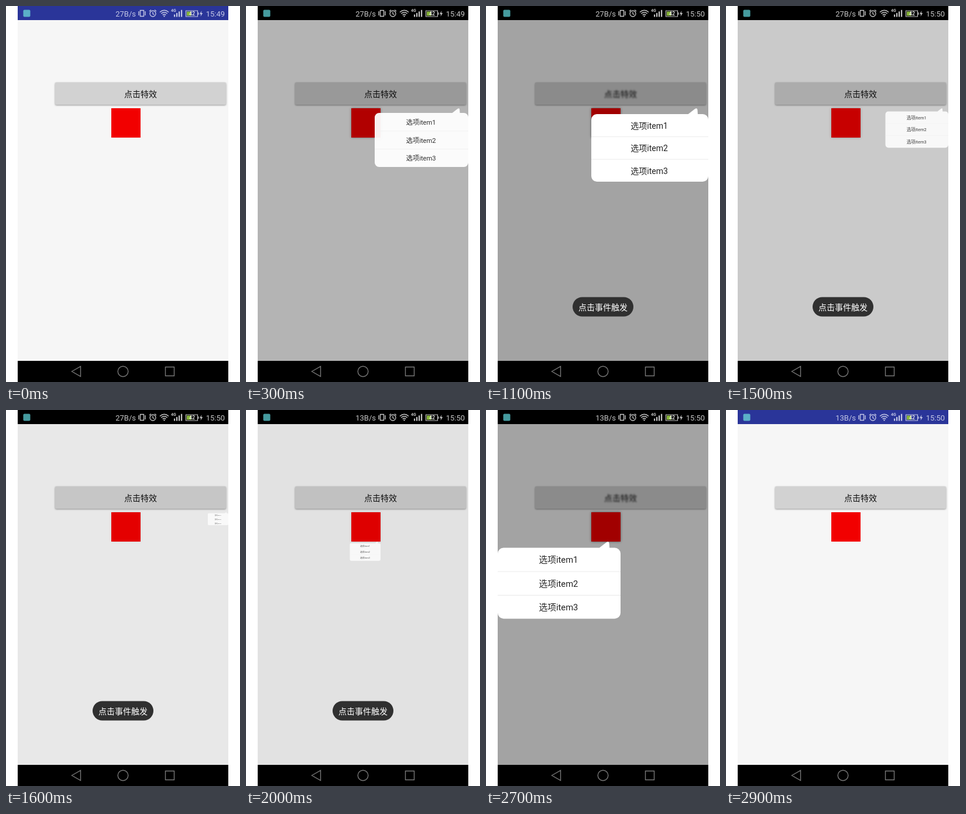
Write an HTML page with a canvas that moves like this. It is 400 px wide and 640 px high and loops after 3000 ms.

```html
<!DOCTYPE html>
<html lang="zh-CN">
<head>
<meta charset="utf-8">
<style>
  html, body { margin: 0; width: 100%; height: 100%; overflow: hidden; background: #fff; }
  canvas { display: block; }
</style>
</head>
<body>
<canvas id="stage" width="400" height="640"></canvas>
<script>
const ctx = document.getElementById('stage').getContext('2d');
const FONT = 'Roboto, "Noto Sans CJK SC", "Noto Sans CJK", sans-serif';

// [step, value] keys; one step is 100 ms
const POPUP = [[0, 0], [1, .15], [3, .8], [5, 1], [13, 1], [14, .9], [16, .175], [17, .03],
  [18, 0], [19, 0], [20, .25], [22, 1], [27, 1], [28, .5], [29, 0]];
const TOAST = [[8, 0], [9, .4], [10, .85], [11, 1], [23, 1], [25, 0]];

function keyed(keys, n) {
  if (n <= keys[0][0]) return keys[0][1];
  for (let i = 1; i < keys.length; i++) {
    const [a, u] = keys[i - 1], [b, v] = keys[i];
    if (n <= b) return u + (v - u) * (n - a) / (b - a);
  }
  return keys[keys.length - 1][1];
}

function box(x, y, w, h, color, r = 0) {
  ctx.fillStyle = color;
  ctx.beginPath();
  ctx.roundRect(x, y, w, h, r);
  ctx.fill();
}

function text(s, x, y, size, color, align = 'center', weight = 400) {
  ctx.font = `${weight} ${size}px ${FONT}`;
  ctx.textAlign = align;
  ctx.fillStyle = color;
  ctx.fillText(s, x, y);
}

function stroke(d, color, width) {
  ctx.strokeStyle = color;
  ctx.lineWidth = width;
  ctx.stroke(new Path2D(d));
}

function shadow(color, blur, y = 0) {
  ctx.shadowColor = color;
  ctx.shadowBlur = blur;
  ctx.shadowOffsetY = y;
}

function statusBar(n, open) {
  const tint = open ? '#c4c4c4' : '#c3c7e6';
  box(20, 0, 360, 24, open ? '#000' : '#2a3599');
  box(29.5, 6.5, 12, 12, open ? '#469b9f' : '#5bb0c8', 2);
  text(n < 20 ? '27B/s' : '13B/s', 222, 17.5, 13, tint, 'right');
  text(n < 9 ? '15:49' : '15:50', 374, 17.5, 13, tint, 'right');

  // vibrate and alarm
  stroke('M229.5 7.5h6v10h-6zM227 9v7M238 9v7', tint, 1.4);
  stroke('M246 13a5 5 0 1 0 10 0a5 5 0 1 0-10 0M251 10v3.3l2.5 1.5M245 9l3-2.5M257 9l-3-2.5', tint, 1.3);

  // wifi
  stroke('M263 10.5Q270.5 4 278 10.5M265.3 13Q270.5 8.5 275.7 13M267.7 15.4Q270.5 13 273.3 15.4', tint, 1.5);
  box(269.3, 16.2, 2.4, 2.2, tint, 1);

  // signal
  text('4G', 282, 9.5, 7, tint, 'left', 700);
  for (let i = 0; i < 4; i++) box(287 + i * 4, 14.5 - i * 2.6, 2.2, 4 + i * 2.6, tint);

  // battery
  stroke('M307.5 8h20v10h-20zM329 11v4', tint, 1.2);
  box(309, 9.5, 8, 7, '#8bb83a');
  text('42', 318, 16.3, 9, '#eee', 'center', 500);
  ctx.fillStyle = tint;
  ctx.fill(new Path2D('M334.5 8L331 13.7h2.3L332.5 18L336.2 12h-2.3z'));
}

function navBar() {
  box(20, 604, 360, 36, '#000');
  stroke('M112.5 622L127.5 613.5V630.5ZM191.2 622a8.8 8.8 0 1 0 17.6 0a8.8 8.8 0 1 0-17.6 0M272.5 614.5h15v15h-15z', '#777', 1.4);
}

function content(p) {
  box(20, 24, 360, 580, '#f6f6f6');
  shadow('#0006', 3, 1);
  box(84, 130, 292, 38, '#d2d2d2', 2);
  shadow(`rgba(0,0,0,${.5 * p})`, 4);
  box(180, 174, 50, 50, '#f20000');
  shadow('transparent', 0);
  const blur = 1.8 * p ** 6;
  if (blur > .1) ctx.filter = `blur(${blur}px)`;
  text('点击特效', 230, 155, 14, '#111', 'center', 500);
  ctx.filter = 'none';
  box(20, 24, 360, 580, `rgba(0,0,0,${.337 * p})`);
}

// Grows from its top right corner at (x, y)
function popup(x, y, scale, alpha) {
  ctx.save();
  ctx.translate(x, y);
  ctx.scale(scale, scale);
  ctx.globalAlpha = alpha;
  const shape = new Path2D('M-35 10.5L-23 1.2Q-18.6-1.2-18.5 3L-18 10.5Z');
  shape.roundRect(-200, 10, 200, 115, 9.5);
  ctx.fillStyle = '#fff';
  ctx.fill(shape);
  for (let i = 0; i < 3; i++) {
    const top = 10 + i * 38.5;
    if (i) box(-200, top - .5, 200, 1, '#ececec');
    text('选项item' + (i + 1), -101, top + 24.7, 14, '#222');
  }
  ctx.restore();
}

function toast(alpha) {
  ctx.globalAlpha = alpha;
  box(148, 495.5, 104, 33, '#303030', 16.5);
  text('点击事件触发', 200, 518, 14, '#fff');
  ctx.globalAlpha = 1;
}

function draw(now) {
  const n = Math.floor(now / 100) % 30;
  const p = keyed(POPUP, n);
  ctx.clearRect(0, 0, 400, 640);
  content(p);
  statusBar(n, p > 0);
  navBar();
  if (p > 0) {
    const alpha = Math.min(1, .7 + .3 * p);
    if (n < 19) popup(380, 174, p, alpha);
    else popup(230, 224, 1.05 * p, alpha);
  }
  toast(keyed(TOAST, n));
}

const start = performance.now();
function tick() {
  draw(performance.now() - start);
  requestAnimationFrame(tick);
}
tick();
</script>
</body>
</html>
```
